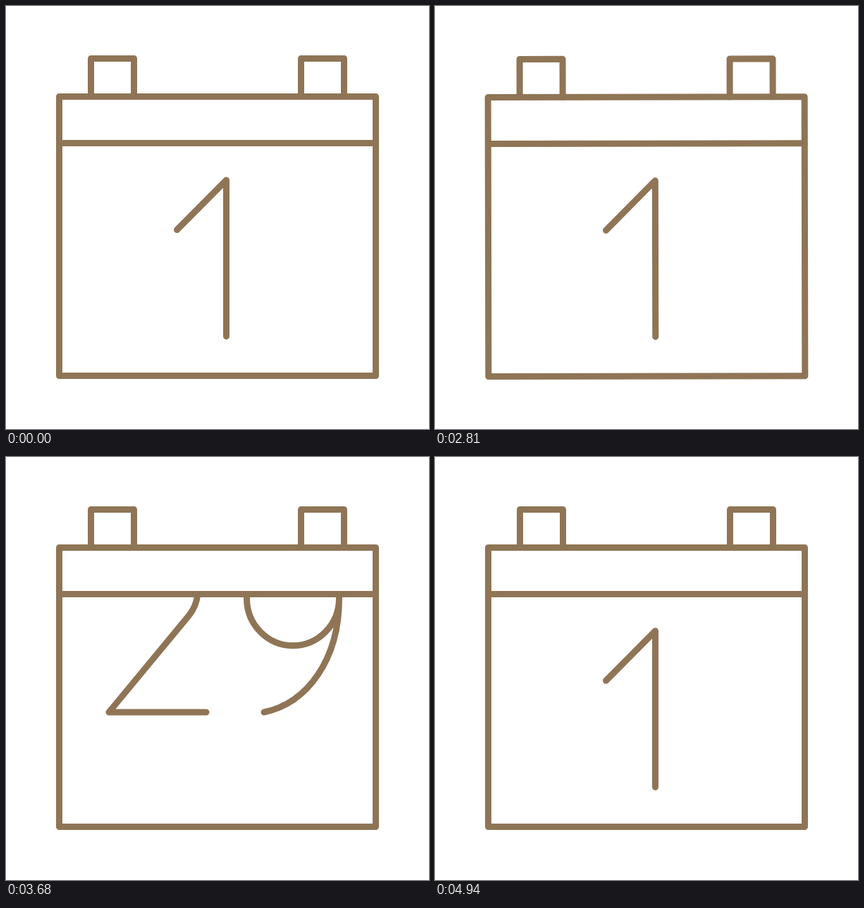
Recreate the animation shown at these times as an HTML page with a canvas. Size 600 by 600 pixels, loop 4.97 s.

```html
<!DOCTYPE html>
<html lang="en">
<head>
<meta charset="utf-8">
<title>Calendar</title>
<style>
html, body { margin: 0; width: 100%; height: 100%; overflow: hidden; background: #fff; }
canvas { display: block; width: 600px; height: 600px; }
</style>
</head>
<body>
<canvas id="stage" width="600" height="600"></canvas>
<script>
const ctx = document.getElementById('stage').getContext('2d');
const LOOP = 4970, REST = 2030, STEP = 30;
const SPEED = 2.4; // px per ms while the numbers roll
const CX = 300, CY = 326.5;

const clamp = v => Math.max(0, Math.min(1, v));
const span = (t, a, b) => clamp((t - a) / (b - a));

function line(...p) {
  ctx.beginPath();
  for (let i = 0; i < p.length; i += 2) ctx.lineTo(p[i], p[i + 1]);
  ctx.stroke();
}

// Digits stand on a baseline at y = 0
function one(x, w, h) {
  line(x - w, w - h + 0.5, x, -h, x, 0);
}

function two(x) {
  ctx.beginPath();
  ctx.arc(x + 68.5, -173, 57.5, Math.PI, 2 * Math.PI + 0.69);
  ctx.lineTo(x, 0);
  ctx.lineTo(x + 138, 0);
  ctx.stroke();
}

function three(x) {
  ctx.beginPath();
  ctx.ellipse(x, -174, 61, 56.5, 0, Math.PI + 0.36, 2.5 * Math.PI);
  ctx.lineTo(x - 15, -118);
  ctx.stroke();
  ctx.beginPath();
  ctx.ellipse(x, -59, 71, 59, 0, -Math.PI / 2, Math.PI - 0.34);
  ctx.stroke();
}

function seven(x) {
  line(x, -230, x + 138, -230, x + 46, 0);
}

function nine(x) {
  ctx.beginPath();
  ctx.ellipse(x, -161.5, 65.5, 67, 0, 0, 2 * Math.PI);
  ctx.bezierCurveTo(x + 65.5, -74, x + 20, -13, x - 41, 0);
  ctx.stroke();
}

// Each number passes baseline y at time t
const rolls = [
  { t: 3200, y: 386, draw() { two(142); two(334); } },
  { t: 3475, y: 386, draw() { two(141); seven(339); } },
  { t: 3680, y: 362, draw() { two(146); nine(407); } },
  { t: 3980, y: 494, draw() { three(222); one(425.5, 73, 231); } }
];

function at(y, draw) {
  ctx.save();
  ctx.translate(0, y);
  draw();
  ctx.restore();
}

function dayOffset(t) {
  if (t < 4200) return 290 * span(t, 2860, 3100) ** 2 + (t > 3100 ? 400 : 0);
  if (t < 4320) return -280 * (1 - span(t, 4200, 4320)) ** 1.5;
  const d = t - 4320;
  return 22 * Math.exp(-0.006 * d) * Math.sin(2 * Math.PI * d / 240);
}

function drawNumbers(t) {
  ctx.save();
  ctx.beginPath();
  ctx.rect(76, 195, 448, 325);
  ctx.clip();
  at(468.5 + dayOffset(t), () => one(312.5, 70, 221.5));
  for (const r of rolls) {
    const y = r.y + (t - r.t) * SPEED;
    if (y > 180 && y < 780) at(y, r.draw);
  }
  ctx.restore();
}

function drawBody() {
  ctx.strokeRect(75.5, 128.5, 449, 396);
  line(75.5, 194.5, 524.5, 194.5);
  for (const x of [120.5, 418.5]) line(x, 128.5, x, 74.5, x + 61, 74.5, x + 61, 128.5);
}

// Jump up with a tilt, fall back, dip on landing
function pose(t) {
  if (t < REST) return [0, 0, 0];
  let lift;
  if (t < 2380) {
    const s = span(t, 1996, 2380);
    lift = s * s * (3 - 2 * s);
  } else {
    lift = 1 - span(t, 2380, 2808) ** 2;
  }
  const dip = Math.sin(Math.PI * span(t, 2808, 3090) ** 0.8);
  return [34.4 * lift, -41.9 * lift + 11 * dip, (8 * lift - 1.7 * dip) * Math.PI / 180];
}

function render(t) {
  ctx.setTransform(1, 0, 0, 1, 0, 0);
  ctx.fillStyle = '#fff';
  ctx.fillRect(0, 0, 600, 600);
  ctx.strokeStyle = '#8f7556';
  ctx.lineWidth = 9;
  ctx.lineCap = ctx.lineJoin = 'round';
  const [dx, dy, tilt] = pose(t);
  ctx.translate(CX + dx, CY + dy);
  ctx.rotate(tilt);
  ctx.translate(-CX, -CY);
  drawNumbers(t);
  drawBody();
}

const start = performance.now();
function tick() {
  const t = (performance.now() - start) % LOOP;
  render(t < REST ? 0 : REST + Math.floor((t - REST) / STEP) * STEP);
  requestAnimationFrame(tick);
}
tick();
</script>
</body>
</html>
```
